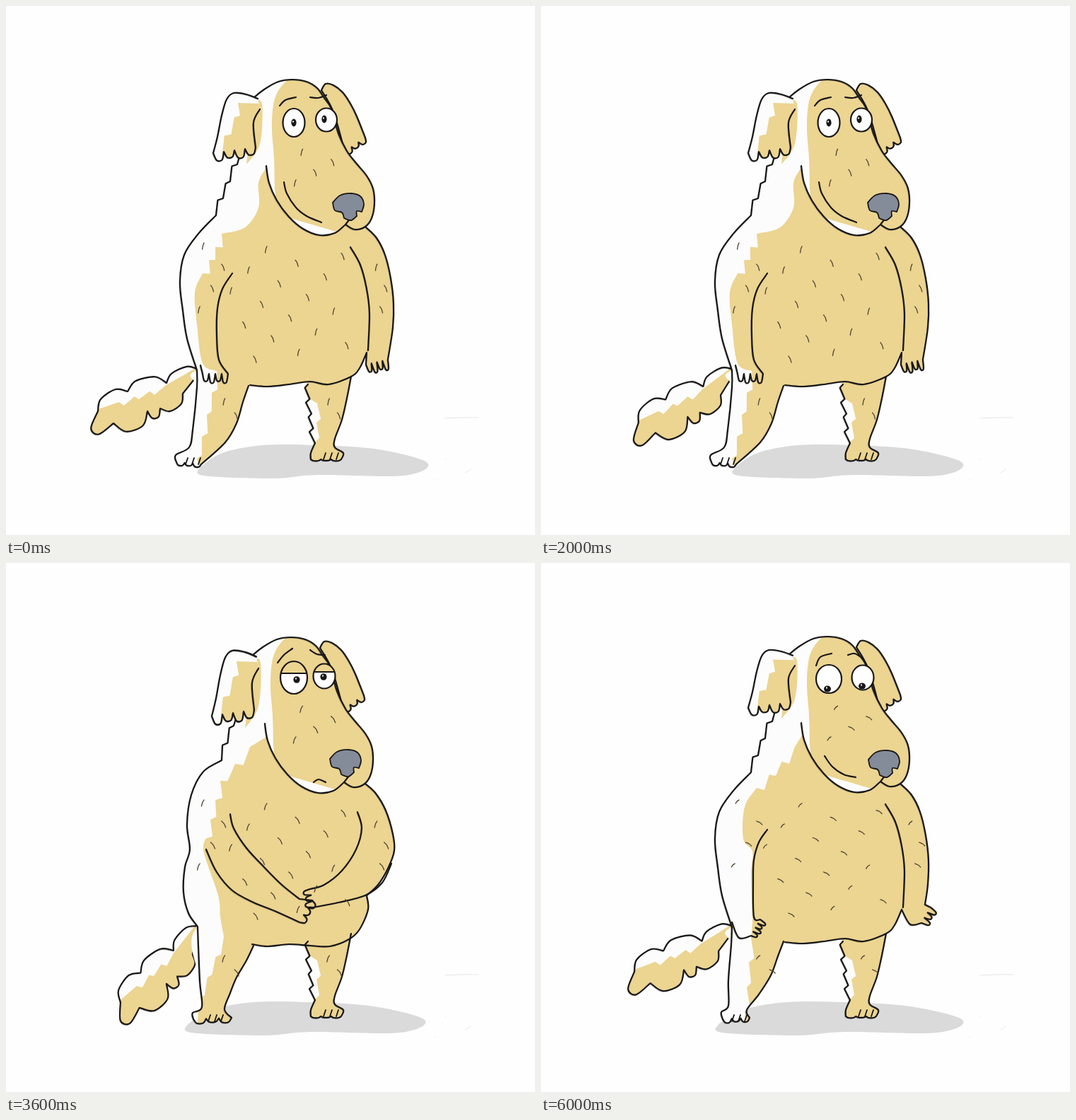
An HTML page with a canvas for the animation above (6400 ms loop, 748 by 748 pixels).

```html
<!DOCTYPE html>
<html lang="en">
<head>
<meta charset="utf-8">
<title>Dog</title>
<style>
html, body { margin: 0; width: 100%; height: 100%; overflow: hidden; background: #fefefe; }
canvas { display: block; }
</style>
</head>
<body>
<canvas id="stage" width="748" height="748"></canvas>
<script>
const LOOP = 6400;
const INK = '#191817', TAN = '#ecd491', WHITE = '#fcfcfc', GREY = '#848b99', SHADE = '#dadada';
const ctx = document.getElementById('stage').getContext('2d');
ctx.lineCap = ctx.lineJoin = 'round';

// Path notation: "x,y" is a point on a smooth curve, "x,y!" a corner, ";" a new line.
// "~n,d" joins its neighbours by n round lobes of depth d, "^n,d" by n pointed tufts.
const TAIL = '266,528 250,548! ~1,11 218,569! ~1,11 200,573! ~1,17 152,590! ~1,25 130,573! ~1,12 172,545! ~1,12 227,533! ~1,9 270,513';
const TAIL_TAN = '270,511! 225,537 ^3,7 160,560 122,573! 100,640! 290,640!';
const TAIL_PIVOT = [270, 515];

const HEAD = '350,130! 365,118 385,107 405,104 425,107 440,116 450,130 460,145 470,180 482,205 495,222 510,240 519,258 521,280 517,300 508,312 493,316 480,309! 465,321 443,324 420,315 400,298 383,275 372,250 368,226';
const HEAD_TAN = '402,100! 386,118 378,140 376,175 379,215 380,258! 384,295! 540,340! 540,100!';
const BACK_EAR = '446,119 452,110 463,112 476,122 487,138 496,156 508,186! ~3,6 479,206! 463,150 446,119';
const EAR = '356,131 340,125 322,123 312,132 305,155 299,185 293,208! ~4,-11 353,200! 350,165 359,146';
const EAR_TAN = '328,137! 362,138! 354,222! 303,228! 306,208 ^2,8 331,155!';
const EAR_SHADOW = '350,134! 362,139 359,195 340,224!';
const NOSE = '-23,-7 -13,-17 3,-20 16,-16 21,-5 18,6! 11,5 11,12! 3,18 -7,15! -10,7 -20,4 -23,-7';

const NECK = '350,140! 400,150! 508,312!';
const FREE_ARM = '487,341 501,366 510,400 514,435 512,487';
const RIGHT_LEG = '488,524 482,555 475,585 465,612 465,624 477,632 474,641! ~3,2 431,641! 431,632 437,618! ^4,6 427,535';
const RIGHT_LEG_WHITE = '413,545! 440,562 ^2,6 438,616! 413,620!';
const PLANTED_LEG = '350,541 340,562 326,586 317,608 309,631 319,643! ~3,6 265,645! 264,636 277,628 274,590 271,515';
const SHADOW = '257,652 290,632 350,621 430,621 520,627 592,646 557,664 430,663 365,668 262,664 257,652';

const relaxedTorso = hand => `270,515 256,470 250,430 246,390 252,352 272,322 297,296! ^3,6 327,224!
  ${NECK} 524,328 536,352 544,385 548,420 547,455 ${hand} 510,490! 500,512 488,524 456,535 430,531 400,535 370,538 345,536`;
const FOLDED_TORSO = `271,514 258,495 251,465 253,430 260,405 256,370 262,328 279,295 305,279! ^2,6 322,230!
  ${NECK} 523,326 537,350 547,383 549,407 540,432 526,455 510,470! 512,490 500,518 485,532 458,542 430,541 400,539 370,542 348,539`;

// Areas strewn with short hairs: x, y, width, height, count.
const HAIRS = [[318, 335, 170, 165, 17], [400, 195, 65, 58, 4], [268, 320, 40, 120, 4], [303, 545, 22, 40, 2], [452, 545, 18, 40, 2], [520, 350, 16, 90, 3]];

const standing = {
  shadow: [596, 0.96], head: [0, 0], earDrop: 1, nose: [485, 285], hairs: [4, 9],
  torso: relaxedTorso('540,500! ~4,13 509,507!'),
  leg: '343,537 335,560 326,590 310,617 276,648! ~3,4 241,645! 240,635 259,624 264,600 270,540 270,515',
  toes: [254, 648],
  tan: '367,230! 357,250 357,285 338,313 305,322! ^3,10 278,378 267,405 270,450 278,505 298,516 ^4,7 270,640 278,665!',
  arms: `320,378 306,400 299,428 298,465 301,500 314,520! ~4,12 278,520! 275,508; ${FREE_ARM}`,
  eyes: [[407, 165, 15.5, 20], [453, 161, 15, 16.5]], pupil: [3.6, 5.4], gaze: [[407, 165], [450, 160]],
  face: '387,141 395,133 410,129; 430,129 441,130 453,126; 393,249 397,265 410,285 425,297 446,306'
};

const nervous = {
  shadow: [592, 1], head: [-3, 2], earDrop: 1.05, nose: [480, 281], hairs: [5, 8],
  torso: FOLDED_TORSO, leg: PLANTED_LEG, toes: [282, 650],
  tan: '367,235! 357,255 357,285 338,313 305,322! ^3,10 278,378 267,410 270,445 263,475 270,502 298,520 ^4,7 272,635 265,665!',
  arms: `305,377 308,400 320,430 340,455 365,468 390,470! ~4,17 388,504! 350,495 305,485 280,460 266,418;
    489,342 501,372 508,400 504,430 493,455 480,466! ~4,-17 502,488! 514,470 538,444`,
  eyes: [[407, 166, 18.5, 19.5], [448, 161, 15.5, 16.5]], pupil: [4.3, 4.5], gaze: [[407, 164], [449, 160]],
  face: '381,141 390,133 403,124; 426,125 435,128 445,129; 391,272 399,267 405,267; 402,279 425,296 446,305! 425,291 404,283'
};

const sad = {
  shadow: [592, 1], head: [-2, 1], earDrop: 1.09, nose: [481, 284], hairs: [6, 9],
  torso: FOLDED_TORSO, leg: PLANTED_LEG, toes: [286, 648],
  tan: '368,246! 345,260 ^2,10 303,308 ^3,9 282,390 280,410 300,470 303,500 308,528 ^3,6 273,615 270,665!',
  arms: `317,355 322,375 340,403 365,430 390,455 415,475! 433,477! ~3,7 415,508! 380,492 350,480 320,463 298,437 283,405;
    497,352 503,375 495,405 475,435 450,455 430,461! ~3,-9 434,487! 470,480 508,470 532,452 545,425`,
  eyes: [[407, 162, 19, 23], [450, 160, 15.5, 17.5]], pupil: [4.6, 4.8], lid: 6,
  gaze: [[411, 165], [449, 161]], lowered: [[411, 174], [453, 168]],
  face: '384,141 393,130 405,121; 430,123 440,129 451,130; 435,310 442,306 452,310'
};

const proud = {
  shadow: [596, 1.03], head: [0, 0], earDrop: 0.96, nose: [486, 285], hairs: [8, 5],
  torso: relaxedTorso('543,483! 551,487! ~3,10 538,509! 522,511'),
  leg: '343,535 335,556 325,583 308,610 291,632 295,643! ~3,5 257,645! 255,635 265,626 265,590 269,540 270,515',
  toes: [270, 648],
  tan: '374,235! 358,262 ^3,10 305,318 288,345 286,390 299,408 297,440 299,500 297,530 ^3,7 288,635 292,665!',
  arms: `320,377 308,395 301,420 300,450 301,500 310,504! ~4,9 297,527! 280,530 270,508; ${FREE_ARM}`,
  eyes: [[407, 164, 18, 20], [455, 162, 15.5, 17.5]], pupil: [5, 4.5], gaze: [[405, 178], [454, 174]],
  face: '389,145 395,133 411,128; 434,130 443,128 451,132; 401,273 412,288 428,299 445,303'
};

function fringe(a, b, [kind, count, depth]) {
  const dx = b.x - a.x, dy = b.y - a.y, length = Math.hypot(dx, dy);
  const points = [];
  const add = (t, bulge, corner) =>
    points.push({ x: a.x + dx * t + dy / length * bulge, y: a.y + dy * t - dx / length * bulge, corner });
  for (let k = 0; k < count; k++) {
    const bulge = depth * (1 - 0.2 * (k % 2));
    if (kind === '^') add((k + 0.8) / count, bulge, true);
    else [0.25, 0.75].forEach(t => add((k + t) / count, bulge, false));
    if (k < count - 1) add((k + 1) / count, 0, true);
  }
  a.corner = b.corner = true;
  return points;
}

function parse(line) {
  const points = [];
  let pending = null;
  for (const token of line.trim().split(/\s+/)) {
    if ('~^'.includes(token[0])) {
      pending = [token[0], ...token.slice(1).split(',').map(Number)];
      continue;
    }
    const [x, y] = token.split(',').map(parseFloat);
    const point = { x, y, corner: token.endsWith('!') };
    if (pending) points.push(...fringe(points.at(-1), point, pending));
    pending = null;
    points.push(point);
  }
  return points;
}

function trace(text) {
  const path = new Path2D();
  for (const points of text.split(';').map(parse)) {
    path.moveTo(points[0].x, points[0].y);
    for (let i = 0; i < points.length - 1; i++) {
      const a = points[i], b = points[i + 1];
      const before = a.corner || i === 0 ? a : points[i - 1];
      const after = b.corner || !points[i + 2] ? b : points[i + 2];
      path.bezierCurveTo(
        a.x + (b.x - before.x) / 6, a.y + (b.y - before.y) / 6,
        b.x - (after.x - a.x) / 6, b.y - (after.y - a.y) / 6, b.x, b.y);
    }
  }
  return path;
}

function ellipse(x, y, rx, ry) {
  const path = new Path2D();
  path.ellipse(x, y, rx, ry, 0, 0, Math.PI * 2);
  return path;
}

function fill(path, color) {
  ctx.fillStyle = color;
  ctx.fill(path);
}

function stroke(path, width = 2.2, color = INK) {
  ctx.lineWidth = width;
  ctx.strokeStyle = color;
  ctx.stroke(path);
}

function isolated(draw) {
  ctx.save();
  draw();
  ctx.restore();
}

const within = (path, draw) => isolated(() => { ctx.clip(path); draw(); });

// A firm line with a faint second pencil pass beside it.
function ink(path) {
  stroke(path);
  isolated(() => {
    ctx.translate(-1, 1);
    stroke(path, 0.9, 'rgba(25,24,23,.4)');
  });
}

function drawPatched(outline, tan) {
  const path = trace(outline);
  fill(path, WHITE);
  within(path, () => fill(trace(tan), TAN));
  ink(path);
}

function drawShadow([right, stretch]) {
  isolated(() => {
    ctx.translate(right, 0);
    ctx.scale(stretch, 1);
    ctx.translate(-592, 0);
    fill(trace(SHADOW), SHADE);
  });
}

function drawTail(degrees) {
  const [x, y] = TAIL_PIVOT;
  isolated(() => {
    ctx.translate(x, y);
    ctx.rotate(degrees * Math.PI / 180);
    ctx.translate(-x, -y);
    drawPatched(TAIL, TAIL_TAN);
  });
}

function drawToes(x, y) {
  for (let i = 0; i < 3; i++) stroke(trace(`${x + i * 9},${y} ${x + i * 9 + 3},${y - 9}`), 1.8);
}

function drawHairs([dx, dy]) {
  for (const [left, top, width, height, count] of HAIRS) {
    for (let i = 0; i < count; i++) {
      const x = left + width * ((0.3 + i * 0.618) % 1), y = top + height * (i + 0.5) / count;
      const lean = dx * (i % 3 ? 1 : -0.6);
      stroke(trace(`${x},${y} ${x + lean * 0.6},${y + dy * 0.4} ${x + lean},${y + dy}`), 1.3, '#4a4333');
    }
  }
}

function drawBody(pose) {
  const outlines = [pose.leg, RIGHT_LEG, pose.torso];
  const silhouette = trace(pose.torso);
  for (const leg of [pose.leg, RIGHT_LEG]) silhouette.addPath(trace(`${leg} 400,480!`));
  fill(silhouette, WHITE);
  within(silhouette, () => {
    fill(trace(`${pose.tan} 700,665! 700,230!`), TAN);
    fill(trace(RIGHT_LEG_WHITE), WHITE);
  });
  outlines.forEach(outline => ink(trace(outline)));
  ink(trace(pose.arms));
  drawToes(...pose.toes);
  drawToes(449, 641);
}

function drawHead(pose) {
  drawPatched(HEAD, HEAD_TAN);
  stroke(trace('487,300 480,309'));
  ctx.translate(0, 125);
  ctx.scale(1, pose.earDrop);
  ctx.translate(0, -125);
  fill(trace(EAR_SHADOW), TAN);
  drawPatched(EAR, EAR_TAN);
}

function drawEye([x, y, rx, ry], [px, py], [prx, pry], lid) {
  const ball = ellipse(x, y, rx, ry);
  fill(ball, '#fff');
  fill(ellipse(px, py, prx, pry), INK);
  fill(ellipse(px - 1, py - 1.5, 1, 1.2), '#fff');
  if (lid) within(ball, () => {
    const left = x - rx, right = x + rx, level = y - lid;
    fill(trace(`${left},${level}! ${left},${y - ry}! ${right},${y - ry}! ${right},${level}!`), TAN);
    stroke(trace(`${left},${level} ${right},${level}`));
  });
  stroke(ball);
}

function drawNose([x, y]) {
  isolated(() => {
    ctx.translate(x, y);
    const nose = trace(NOSE);
    fill(nose, GREY);
    stroke(nose, 1.8);
  });
}

function drawDog(pose, tailAngle, gaze) {
  const offset = draw => isolated(() => { ctx.translate(...pose.head); draw(); });
  drawShadow(pose.shadow);
  drawTail(tailAngle);
  offset(() => drawPatched(BACK_EAR, '400,90! 540,90! 540,220! 400,220!'));
  drawBody(pose);
  offset(() => drawHead(pose));
  drawHairs(pose.hairs);
  pose.eyes.forEach((eye, i) => drawEye(eye, gaze[i], pose.pupil, pose.lid));
  stroke(trace(pose.face));
  drawNose(pose.nose);
}

function sceneAt(t) {
  if (t < 800) return [standing, 0, standing.gaze];
  if (t < 3000) {
    const beat = Math.min(Math.floor((t - 800) / 200), 8);
    return [standing, beat % 2 ? 8.4 : -6.8, standing.gaze];
  }
  if (t < 3600) return [nervous, -4, nervous.gaze];
  if (t < 6000) {
    const lookingDown = (t >= 4400 && t < 5200) || t >= 5600;
    return [sad, -22, lookingDown ? sad.lowered : sad.gaze];
  }
  return [proud, -2, proud.gaze];
}

let shown = [];
function frame(now) {
  const scene = sceneAt(now % LOOP);
  if (scene.some((value, i) => value !== shown[i])) {
    shown = scene;
    fill(trace('0,0! 748,0! 748,748! 0,748!'), '#fefefe');
    stroke(trace('621,583 645,582 668,582; 650,660 657,655; 606,670 607,670; 621,641 622,641'), 1, '#e6e6e6');
    drawDog(...scene);
  }
  requestAnimationFrame(frame);
}
frame(performance.now());
</script>
</body>
</html>
```
